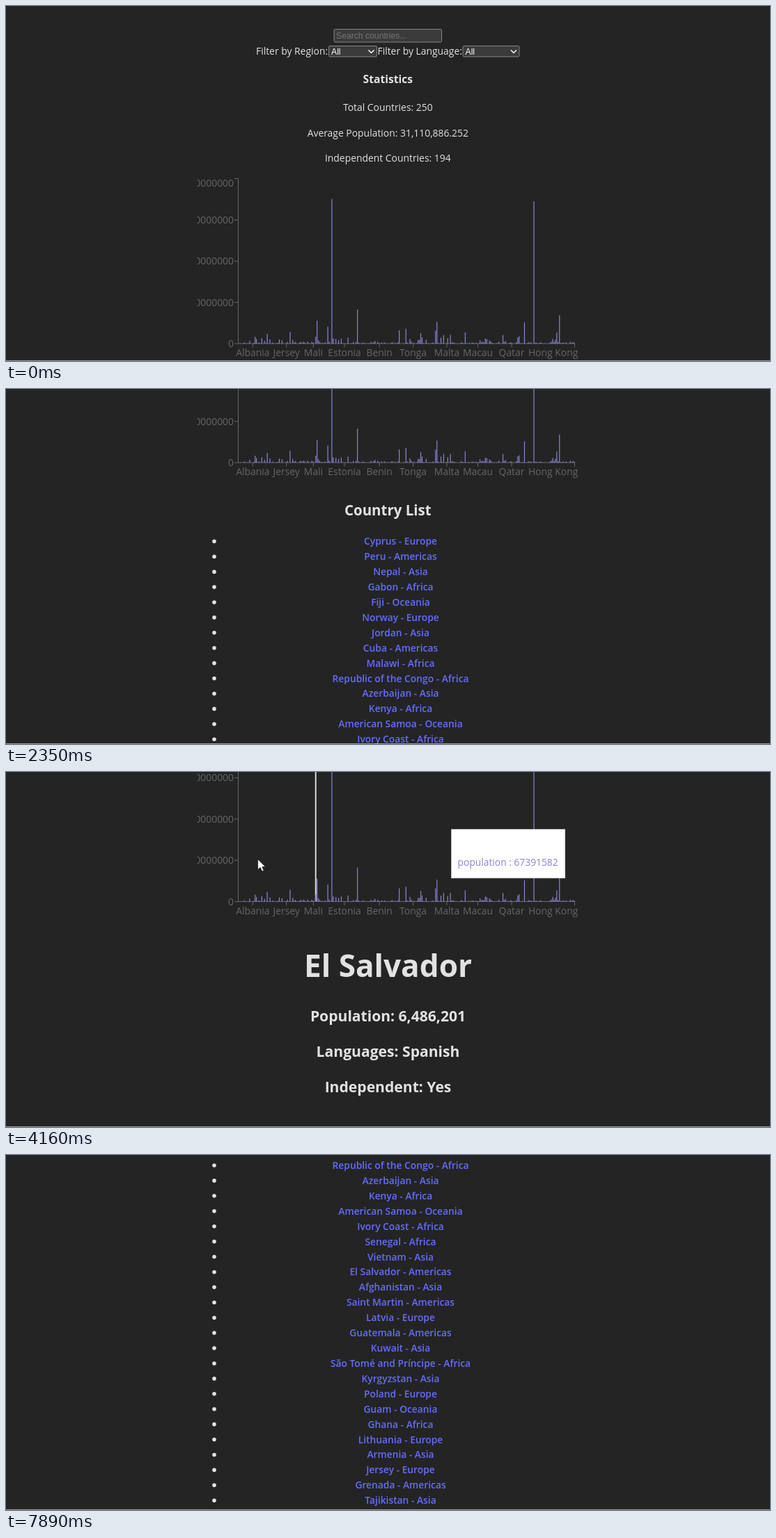
Recreate the animation shown at these times as an HTML page. Size 1097 by 511 pixels, loop 8000 ms.

```html
<!DOCTYPE html>
<html lang="en">
<head>
<meta charset="utf-8">
<title>Country statistics</title>
<style>
  html, body { margin: 0; width: 100%; height: 100%; overflow: hidden; background: #242424; }
  svg { display: block; width: 1097px; height: 511px; }
  text { font-family: "Open Sans", "Noto Sans", sans-serif; font-size: 13.9px; fill: #e2e2e2; }
  .mid { text-anchor: middle; }
  .bold { font-weight: 700; }
  .link { font-weight: 600; font-size: 13.8px; fill: #646cff; }
  .tick { fill: #666; }
  .form { font-family: "Liberation Sans", Arial, sans-serif; font-size: 12.2px; fill: #fff; }
  .axis { stroke: #666; stroke-width: 1; fill: none; }
  .box { fill: #3b3b3b; stroke: #858585; stroke-width: 1; }
</style>
</head>
<body>
<svg id="stage" viewBox="0 0 1097 511">
  <defs><clipPath id="chartClip"><rect x="274.5" y="240" width="548" height="275"/></clipPath></defs>
  <g id="page">
    <g id="head"></g>
    <g id="chart" clip-path="url(#chartClip)"></g>
    <g id="list"></g>
    <g id="detail"></g>
  </g>
  <g id="tip">
    <rect x=".5" y=".5" width="163" height="70" fill="#fff" stroke="#ccc"/>
    <text id="tipText" x="9.5" y="52.5" style="fill:#8884d8;font-size:13.8px"></text>
  </g>
  <g id="status">
    <rect x="0" y="497" width="145" height="14" fill="#1f1f1f"/>
    <text x="140" y="509.5" text-anchor="end" style="font-size:10.3px;fill:#adadad">localhost:5173/country/Guam</text>
  </g>
  <rect y="510" width="1097" height="1" fill="#fff" opacity=".55"/>
  <path id="arrow" d="M0 0V15.2L3.6 12L6 17.6L8.6 16.5L6.3 11.1H11Z" fill="#fff" stroke="#1a1a1a" stroke-width=".8"/>
  <path id="hand" d="M-1.6 1Q0-1 1.5 1V6.2Q3.2 5.2 4.2 6.8Q6 6 6.9 7.6Q9.2 7.2 9.3 9.5V13Q9.2 15.5 7.7 18.2H-.2Q-1.8 14.8-4.6 11.4Q-5 9.2-2.8 9.7L-1.6 11Z" fill="#fff" stroke="#1a1a1a" stroke-width=".7"/>
  <path id="beam" d="M-3-7Q-.5-7 0-6Q.5-7 3-7M0-6V6M-3 7Q-.5 7 0 6Q.5 7 3 7" fill="none" stroke="#fff"/>
</svg>
<script>
const LOOP = 8000, NS = "http://www.w3.org/2000/svg";
const $ = id => document.getElementById(id);

function add(parent, tag, attrs, label) {
  const el = document.createElementNS(NS, tag);
  for (const k in attrs) el.setAttribute(k, attrs[k]);
  if (label !== undefined) el.textContent = label;
  parent.appendChild(el);
  return el;
}
function write(parent, label, x, y, cls, size) {
  const el = add(parent, "text", { x, y, class: cls || "" }, label);
  if (size) el.style.fontSize = size + "px";
  return el;
}

// Form and statistics
const head = $("head");
const search = add(head, "rect", { x: 471, y: 33.5, width: 154.5, height: 18.5, rx: 1.5, class: "box" });
write(head, "Search countries...", 474, 46.5, "form").style.fill = "#757575";
write(head, "Filter by Region:", 359, 69.5);
write(head, "Filter by Language:", 533.5, 69.5);
for (const [x, w] of [[463.5, 69], [656, 81]]) {
  add(head, "rect", { x, y: 57.5, width: w, height: 15.5, rx: 1.5, class: "box" });
  write(head, "All", x + 3.5, 69.5, "form");
  add(head, "path", { d: `M${x + w - 12} 63.5l4 4l4-4`, fill: "none", stroke: "#fff", "stroke-width": 1.5 });
}
write(head, "Statistics", 548.3, 110.5, "mid bold", 15.6);
["Total Countries: 250", "Average Population: 31,110,886.252", "Independent Countries: 194"]
  .forEach((s, i) => write(head, s, 548.3, 151 + i * 36.6, "mid"));

// Chart: [x, population in millions]
const LEFT = 333.5, STEP = 483.5 / 250, BASE = 486, SCALE = 237.6 / 1600;
const peaks = [
  [350, 28], [358, 67], [360, 45], [367, 52], [371, 27], [375, 95], [379, 41], [393, 40], [396, 32],
  [408, 115], [411, 36], [433, 20], [445, 67.391582], [447, 220.892331], [449, 34], [462, 164.689383],
  [468, 1402.112], [470, 50], [474, 45], [478, 34], [482, 48], [491, 59], [505, 329.484123], [530, 26],
  [565, 128.932753], [574, 144.104080], [580, 44], [592, 34], [594, 37], [596, 102], [598, 59], [604, 36],
  [617, 126], [619, 212.559409], [625, 58], [629, 83], [634, 53], [638, 84], [660, 109], [680, 32],
  [689, 48], [691, 43], [695, 31], [714, 83], [718, 25], [735, 60], [737, 71], [745, 206.139587],
  [758, 1380.004385], [785, 45], [789, 37], [791, 109], [795, 273.523621]
];
let seed = 11;
const rand = () => (seed = (seed * 16807) % 2147483647) / 2147483647;
const people = Array.from({ length: 250 }, () => .3 + 19 * rand() ** 3);
const slot = x => Math.floor((x - LEFT) / STEP);
for (const [x, p] of peaks) people[slot(x)] = p;

const chart = $("chart");
const glow = add(chart, "rect", { y: 248, width: STEP, height: 238, fill: "#ddd" });
let axis = `M${LEFT} 248V${BASE}H817`;
for (let i = 0; i < 5; i++) {
  const y = 248.5 + i * 59.4;
  axis += `M${LEFT - 5.5} ${y}h5.5`;
  write(chart, i < 4 ? (4 - i) * 400000000 : "0", 327, (i ? y : 255) + 5, "tick").setAttribute("text-anchor", "end");
}
const labels = ["Albania", "Jersey", "Mali", "Estonia", "Benin", "Tonga", "Malta", "Macau", "Qatar", "Hong Kong"];
const marks = [354.3, 402.7, 441.4, 486, 536.2, 584.6, 633, 677.5, 726, 785.6];
labels.forEach((s, i) => {
  write(chart, s, marks[i], 504, "mid tick");
  axis += `M${i < 9 ? marks[i] : 816.5} ${BASE}v5.5`;
});
add(chart, "path", { d: axis, class: "axis" });
people.forEach((p, i) => add(chart, "rect", {
  x: (LEFT + i * STEP + .35).toFixed(2), y: (BASE - p * SCALE).toFixed(2),
  width: 1.2, height: (p * SCALE).toFixed(2), fill: "#8884d8"
}));

// Country list
const ROW = 21.92, FIRST = 599.3, LIST_TOP = FIRST + 9 * ROW - 15;
const regions = { E: "Europe", A: "Asia", F: "Africa", M: "Americas", O: "Oceania" };
const list = $("list");
write(list, "Country List", 548.3, 561.8, "mid bold", 20.5);
const rows = ("Cyprus E,Peru M,Nepal A,Gabon F,Fiji O,Norway E,Jordan A,Cuba M,Malawi F,Republic of the Congo F," +
  "Azerbaijan A,Kenya F,American Samoa O,Ivory Coast F,Senegal F,Vietnam A,El Salvador M,Afghanistan A," +
  "Saint Martin M,Latvia E,Guatemala M,Kuwait A,São Tomé and Príncipe F,Kyrgyzstan A,Poland E,Guam O," +
  "Ghana F,Lithuania E,Armenia A,Jersey E,Grenada M,Tajikistan A,Iceland E").split(",").map((s, i) => {
  const label = s.slice(0, -2) + " - " + regions[s.slice(-1)], y = FIRST + i * ROW;
  add(list, "circle", { cx: 299, cy: y, r: 2.8, fill: "#e2e2e2" });
  return { y, half: label.length * 3.8, el: write(list, label, 566.5, y + 5, "mid link") };
});

// Country page
const DETAIL_TOP = 299.5;
const lines = [[295, 44.1], [358.5, 21.1], [409.5, 21.1], [460.5, 21.1]]
  .map(([y, size]) => write($("detail"), "", 548.5, y + DETAIL_TOP, "mid bold", size));
const countries = {
  salvador: ["El Salvador", "Population: 6,486,201", "Languages: Spanish", "Independent: Yes"],
  guam: ["Guam", "Population: 168,783", "Languages: Chamorro, English, Spanish", "Independent: No"]
};

// Pointer path: [time, x, y]
const path = [
  [0, 1120, 500], [70, 1090, 480], [450, 800, 220], [870, 580, 58], [930, 578, 56], [1060, 555, 42],
  [1200, 640, 75], [1550, 1102, 203], [1560, 1110, 530], [2350, 1056, 515], [2600, 760, 270],
  [2880, 533, 164], [3150, 533, 164], [3450, 957, 105], [3760, 631, 73], [3880, 631, 73], [4090, 445, 102],
  [4160, 363, 124], [4340, 110, 374], [4480, 31, 220], [4610, 40, -25], [4940, 236, -25],
  [4950, 237, 2], [5360, 562, 309], [5480, 563, 364], [5830, 563, 364], [6290, 700, 394], [6440, 700, 394],
  [6640, 672, 376], [6950, 240, 190], [7230, -15, 82], [8000, -15, 82]
];
const mix = (a, b, k) => a + (b - a) * k;
const part = (t, a, b) => Math.min(1, Math.max(0, (t - a) / (b - a)));
function pointer(t) {
  const i = Math.max(1, path.findIndex(p => p[0] >= t));
  const [t0, x0, y0] = path[i - 1], [t1, x1, y1] = path[i], k = part(t, t0, t1);
  return { x: mix(x0, x1, k), y: mix(y0, y1, k) };
}
const show = (el, on) => el.setAttribute("visibility", on ? "visible" : "hidden");
const move = (el, x, y) => el.setAttribute("transform", `translate(${x.toFixed(2)} ${y.toFixed(2)})`);

function scrollAt(t) {
  if (t < 2080) return 0;
  const k = part(t, 2140, 2880);
  return mix(94.5, LIST_TOP, 1 - (1 - k) ** 1.6);
}

function draw(t) {
  const name = t >= 3150 && t < 4950 ? "salvador" : t >= 5830 && t < 7890 ? "guam" : "";
  const top = name ? DETAIL_TOP : scrollAt(t);
  const { x, y } = pointer(t);
  move($("page"), 0, -top);
  show(list, !name);
  show($("detail"), name);
  if (name) lines.forEach((el, i) => el.textContent = countries[name][i]);

  let onLink = false;
  for (const row of rows) {
    const over = !name && Math.abs(y + top - row.y) < ROW / 2 && Math.abs(x - 566.5) < row.half;
    row.el.style.fill = over ? "#535bf2" : "#646cff";
    onLink = onLink || over;
  }
  const inSearch = !top && x > 471 && x < 625 && y > 34 && y < 52;
  search.style.stroke = inSearch ? "#b0b0b0" : "#858585";

  // The highlight trails the pointer, the tooltip trails further
  const hot = pointer(t - 70), late = pointer(t - 280);
  const active = name === "salvador" && hot.x > LEFT && hot.x < 817 && hot.y > -51 && hot.y < 186;
  show(glow, active);
  show($("tip"), active);
  if (active) {
    const i = slot(hot.x), right = late.x + 9;
    glow.setAttribute("x", LEFT + i * STEP);
    $("tipText").textContent = "population : " + Math.round(people[i] * 1e6);
    move($("tip"), right + 164 < 822 ? right : Math.min(late.x, 817) - 173, late.y + 9);
  }

  $("status").setAttribute("opacity", Math.min(part(t, 5600, 5690), 1 - part(t, 6600, 6800) * 1));
  const kind = onLink ? "hand" : inSearch ? "beam" : "arrow";
  for (const id of ["arrow", "hand", "beam"]) {
    show($(id), id === kind);
    move($(id), x, y);
  }
}

function tick() {
  draw(performance.now() % LOOP);
  requestAnimationFrame(tick);
}
tick();
</script>
</body>
</html>
```
